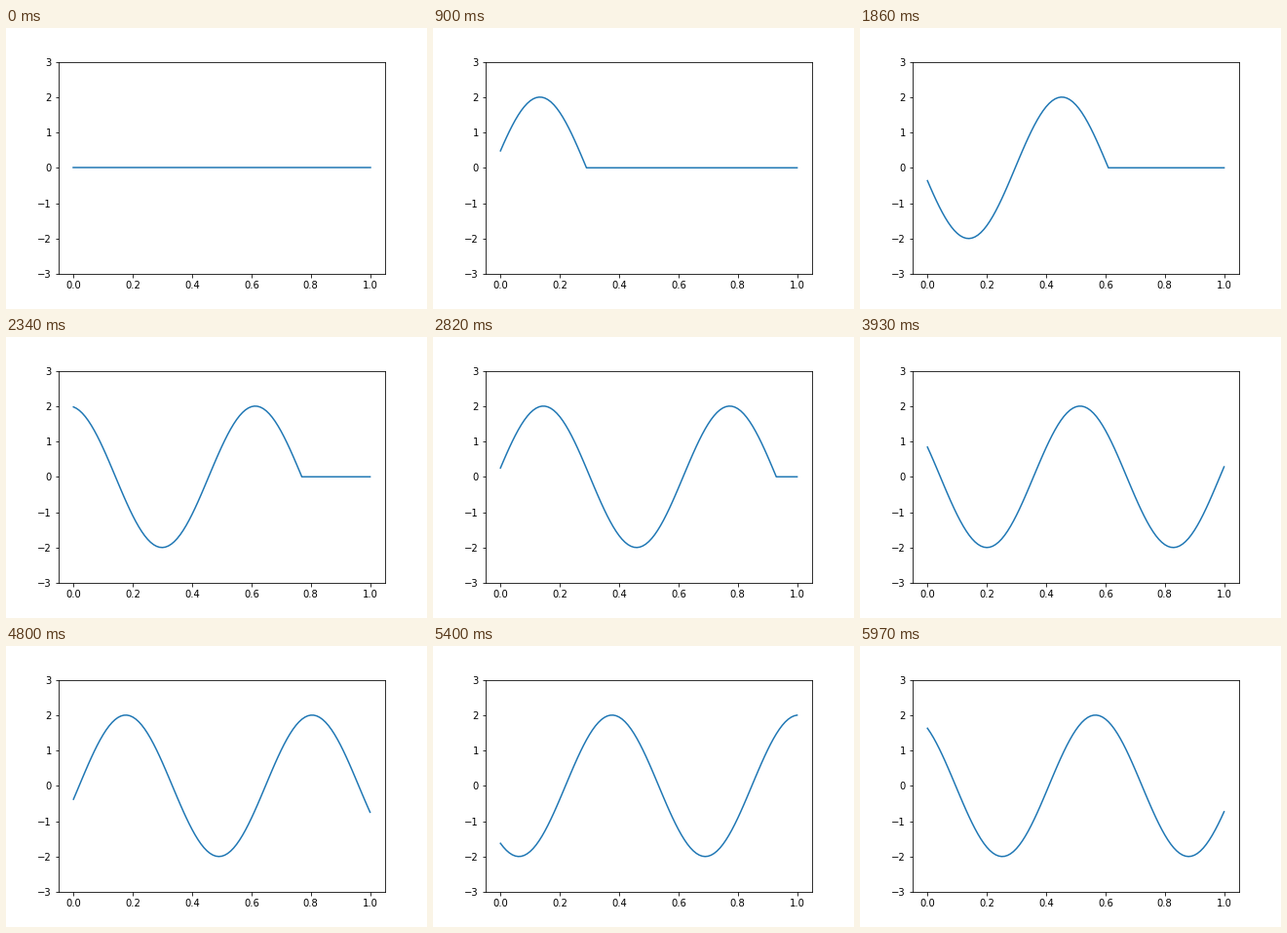
A matplotlib script for the animation above (6000 ms loop, 432x288 px).

```python
import numpy as np
import matplotlib.pyplot as plt
from matplotlib.animation import FuncAnimation

FRAMES = 200
INTERVAL = 30       # ms
AMPLITUDE = 2
OMEGA = 10          # rad per unit of time
SPEED = 1
DT = 0.01

plt.rcParams.update({
    "font.family": "DejaVu Sans",
    "font.size": 10,
    "figure.subplot.bottom": 0.125,
})

x = np.linspace(0, 1, 101)


def wave(t):
    """Sine wave driven from x = 0, at rest ahead of its front."""
    delay = np.maximum(t - x / SPEED, 0)
    return AMPLITUDE * np.sin(OMEGA * delay)


fig, ax = plt.subplots(figsize=(6, 4), dpi=72)
line, = ax.plot(x, wave(0))
ax.set_ylim(-3, 3)


def update(i):
    # the wave starts one step late
    line.set_ydata(wave(max(i - 1, 0) * DT))
    return line,


anim = FuncAnimation(fig, update, frames=FRAMES, interval=INTERVAL,
                     repeat=True, repeat_delay=0)

plt.show()
```
